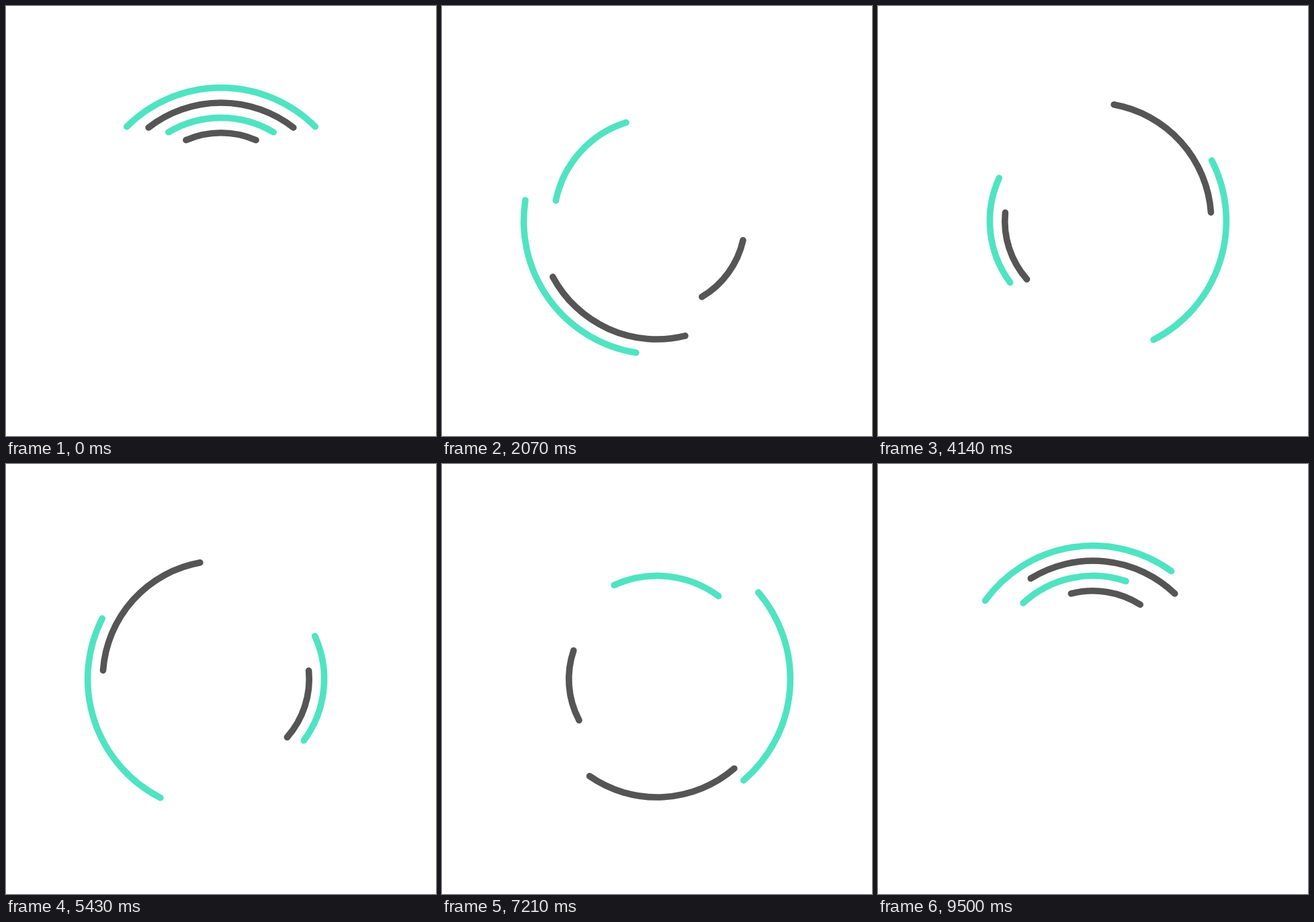
These frames come from a looping animation (640 px wide and 640 px high, 9.57 s). An HTML page with a canvas:

```html
<!DOCTYPE html>
<html lang="en">
<head>
<meta charset="utf-8">
<title>Spinning arcs</title>
<style>
  html, body { margin: 0; height: 100%; overflow: hidden; background: #fff; }
  canvas { display: block; width: 640px; height: 640px; }
</style>
</head>
<body>
<canvas width="640" height="640"></canvas>
<script>
const ctx = document.querySelector('canvas').getContext('2d');
const TAU = 2 * Math.PI;
const LOOP = 9570;
const TEAL = '#50e3c2', GREY = '#555';

// span: part of a full circle; turns: signed rotations per cycle
const arcs = [
  { radius: 198.4, span: 0.25, turns: 3, color: TEAL },
  { radius: 176, span: 0.21, turns: -2, color: GREY },
  { radius: 153.6, span: 0.17, turns: 4, color: TEAL },
  { radius: 131.2, span: 0.13, turns: -3, color: GREY },
];

// Shown at 14 steps per second, each step picking a pose from a 240-pose cycle at 25 per second
function cycleAt(ms) {
  const step = Math.floor((Math.floor(ms / 10) * 10 + 5) * 14 / 1000);
  return Math.ceil(step * 25 / 14) / 240;
}

function draw(ms) {
  const cycle = cycleAt(ms);
  ctx.clearRect(0, 0, 640, 640);
  ctx.lineWidth = 9.6;
  ctx.lineCap = 'round';
  for (const { radius, span, turns, color } of arcs) {
    const middle = turns * cycle - 0.25;
    ctx.strokeStyle = color;
    ctx.beginPath();
    ctx.arc(320, 320, radius, (middle - span / 2) * TAU, (middle + span / 2) * TAU);
    ctx.stroke();
  }
}

let start;
function tick(now) {
  start ??= now;
  draw((now - start) % LOOP);
  requestAnimationFrame(tick);
}
draw(0);
requestAnimationFrame(tick);
</script>
</body>
</html>
```
